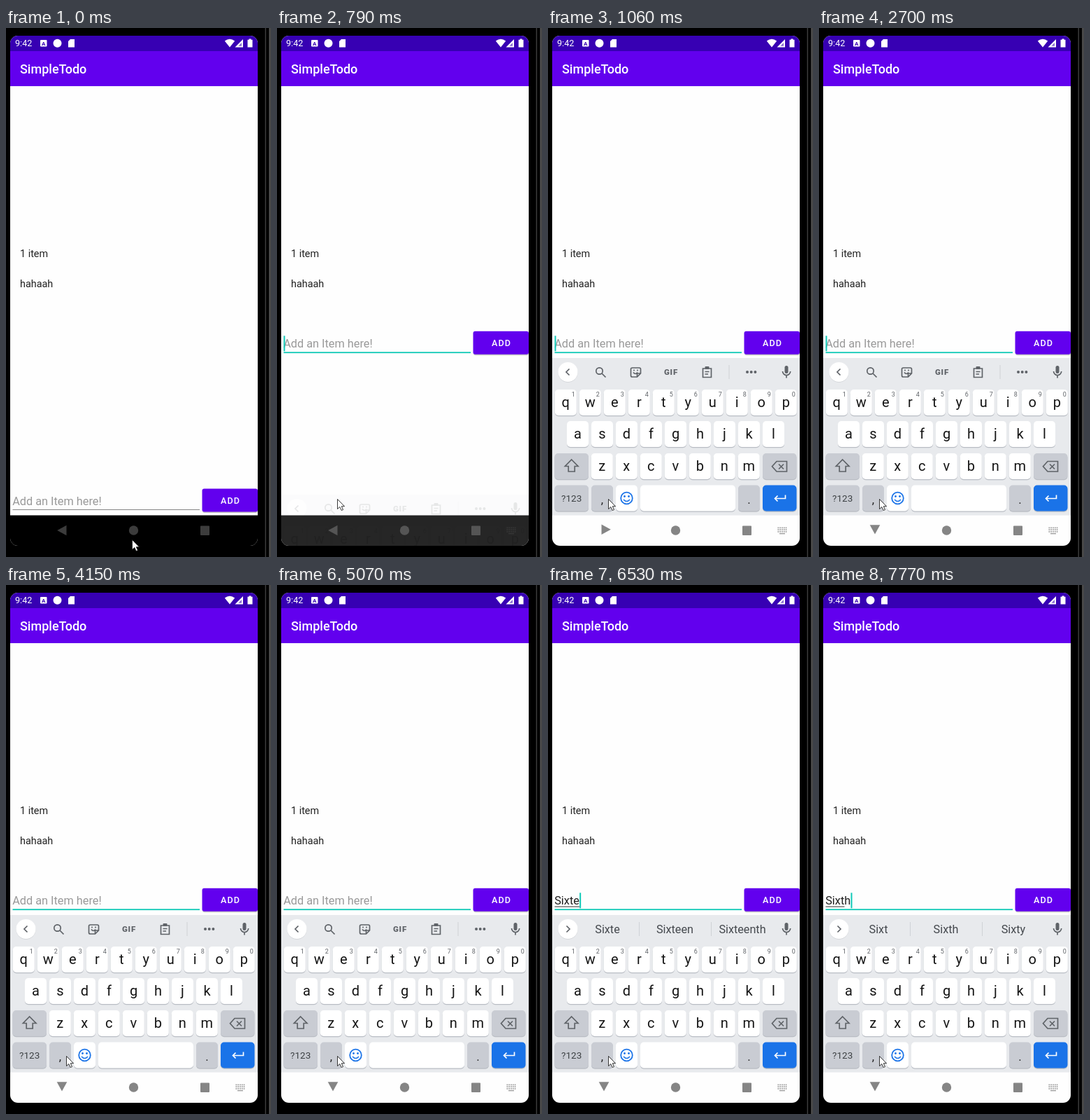
An HTML page that plays this animation: 379 by 755 pixels, repeating every 8 s.

```html
<!DOCTYPE html>
<html lang="en">
<head>
<meta charset="utf-8">
<title>Todo list</title>
<style>
html, body { margin: 0; width: 100%; height: 100%; overflow: hidden; background: #000; }
svg { display: block; width: 379px; height: 755px; font-family: Roboto, sans-serif; }
text { white-space: pre; }
.mid { text-anchor: middle; }
.line { fill: none; stroke: #5f6368; stroke-width: 1.7; }
</style>
</head>
<body>
<svg id="stage" viewBox="0 0 379 755"></svg>
<script>
const LOOP = 8000, TEAL = '#0fc9b7', GREY = '#5f6368';

const rect = (x, y, w, h, fill, r = 0, extra = '') =>
  `<rect x="${x}" y="${y}" width="${w}" height="${h}" rx="${r}" fill="${fill}" ${extra}/>`;
const circle = (x, y, r, fill, extra = '') => `<circle cx="${x}" cy="${y}" r="${r}" fill="${fill}" ${extra}/>`;
const path = (d, fill, extra = '') => `<path d="${d}" fill="${fill}" ${extra}/>`;
const line = (d, extra = '') => `<path class="line" d="${d}" ${extra}/>`;
const text = (x, y, size, fill, str, extra = '') =>
  `<text x="${x}" y="${y}" font-size="${size}" fill="${fill}" ${extra}>${str}</text>`;
const key = (x, y, w, fill = '#fff') =>
  rect(x, y + 1.2, w, 37, '#b9bdc4', 5) + rect(x, y, w, 37, fill, 5);

function letterRow(letters, first, y, digits) {
  return [...letters].map((c, i) => {
    const x = first + i * 35;
    return key(x - 15.5, y, 31) +
      text(x, y + 24.5, 20, '#151515', c, 'class="mid letter"') +
      (digits ? text(x + 11, y + 10, 9, GREY, (i + 1) % 10, 'class="mid"') : '');
  }).join('');
}

function keyboard() {
  const soft = '#c9ccd3';
  const toolbar =
    circle(73.5, 489.5, 4.7, 'none', 'class="line"') + line('M77 493l5.5 5.5', 'stroke-width="2"') +
    line('M120.5 485h10a2 2 0 0 1 2 2v6l-5 5h-7a2 2 0 0 1-2-2v-9a2 2 0 0 1 2-2zM132 493h-4.500v4.500M122 491.500q3 4 6 0') +
    circle(123, 488.5, 1, GREY) + circle(128, 488.5, 1, GREY) +
    text(176, 494.7, 11.5, GREY, 'GIF', 'class="mid" font-weight="900" letter-spacing=".8"') +
    line('M221.500 486h12v12.500h-12zM224.500 490.500h6M224.500 494h4.500') + rect(224.5, 483, 6, 4, GREY, 1) +
    rect(258.5, 481, 1, 20, '#cfd2d6') +
    [285, 290.7, 296.4].map(x => circle(x, 491, 2, GREY)).join('');
  const strip = [85, 181.5, 278].map(x => text(x, 497, 16.2, '#45494e', '', 'class="mid word"')).join('') +
    rect(130, 481, 1, 20, '#cfd2d6') + rect(233, 481, 1, 20, '#cfd2d6');
  return rect(6, 471, 354, 224.5, '#e8eaed') +
    circle(28.5, 491.8, 14, '#cfd2d6') + circle(28.5, 491, 14, '#fff') +
    line('M30.500 486.500L26 491L30.500 495.500', 'id="chevron"') +
    `<g id="toolbar">${toolbar}</g><g id="strip">${strip}</g>` +
    rect(338.5, 482, 5, 11, GREY, 2.5) + line('M335.500 490a5.600 5.600 0 0 0 11.200 0M341 495.500v4') +
    letterRow('qwertyuiop', 25.3, 516, true) +
    letterRow('asdfghjkl', 42.5, 561) +
    letterRow('zxcvbnm', 77.3, 607) +
    key(9.5, 607, 48.5, soft) +
    path('M33.700 616l9.300 9.500h-4.800v7.500h-9v-7.500h-4.800z', 'none', 'id="shift" class="line"') +
    key(307, 607, 48.5, soft) +
    line('M327 618.500h14.500v14.500h-14.500l-6.500-7.250zM330 622.500l7 7M337 622.500l-7 7') +
    key(9.5, 652.5, 48.5, soft) + text(33.7, 676, 13.5, '#3c4043', '?123', 'class="mid"') +
    key(62, 652.5, 31, soft) + text(77.5, 678.5, 17, '#222', ',', 'class="mid"') +
    key(97, 652.5, 31) +
    circle(112.5, 671, 8.3, 'none', 'stroke="#1a73e8" stroke-width="1.8"') +
    circle(109.5, 668.5, 1.4, '#1a73e8') + circle(115.5, 668.5, 1.4, '#1a73e8') +
    line('M108 673q4.500 5 9 0', 'style="stroke:#1a73e8"') +
    key(132, 652.5, 136) +
    key(272, 652.5, 31, soft) + text(287.5, 678.5, 17, '#222', '.', 'class="mid"') +
    key(307, 652.5, 48.5, '#1a73e8') +
    line('M339.500 666.500v5h-15M328.500 667.500l-4 4 4 4', 'style="stroke:#fff"');
}

const statusBar =
  rect(6, 11, 354, 22, '#3700b3') +
  text(13, 26.3, 12.6, '#fff', '9:42') +
  rect(49, 17, 9.5, 9.5, '#fff', 1) +
  text(53.8, 24.8, 8, '#3700b3', 'A', 'class="mid" font-weight="700"') +
  circle(73.5, 21.7, 6, '#fff') +
  path('M92 16h6v11.500h-9v-8.500z', '#fff') +
  path('M312.800 18.500q7.200-5.500 14.400 0l-7.200 9z', '#fff') +
  path('M339 16v11.500h-11.500z', '#fff') +
  path('M337 21v4.700h-4.700z', '#8a6bd2') +
  path('M347.500 15.500h3v1.200h2v10.800h-7v-10.800h2z', '#fff');

const entry =
  text(9.2, 681, 16.3, '#999', 'Add an Item here!', 'id="hint"') +
  text(9.2, 681, 16.3, '#202020', '', 'id="typed"') +
  rect(9.5, 683.3, 0, 1, '#333', 0, 'id="underline"') +
  rect(9.5, 687, 267.5, 1, '#858585', 0, 'id="rule"') +
  rect(9.5, 664, 2, 22, TEAL, 0, 'id="caret"') +
  rect(281, 659, 79, 33, '#000', 3, 'opacity=".22"') +
  rect(280.5, 657.5, 79.5, 33, '#6200ee', 3) +
  text(321, 678.7, 12.6, '#fff', 'ADD', 'class="mid" font-weight="500" letter-spacing="1.13"');

const nav =
  path('M-6.800 0L6.500 -7.300V7.300z', 'inherit', 'id="back"') +
  '<circle cx="182.500" cy="717" r="6.700"/><rect x="278" y="710.500" width="13" height="13.500" rx="1"/>' +
  `<g id="switcher">${[0, 1, 2].map(r => [0, 1, 2, 3, 4].map(c =>
    rect(328.5 + c * 2.8, 712.5 + r * 2.8, 1.7, 1.7, '#999')).join('')).join('')}${rect(331, 721, 8, 1.3, '#999')}</g>`;

const stage = document.getElementById('stage');
stage.innerHTML =
  `<clipPath id="screen">${rect(6, 11, 354, 728, '#000', 11)}</clipPath>` +
  rect(0, 0, 379, 755, '#000') + rect(370.5, 0, 1.5, 755, '#3a3a3a') + rect(376, 0, 3, 755, '#484848') +
  '<g clip-path="url(#screen)">' + rect(6, 11, 354, 728, '#fefefe') + statusBar +
  rect(6, 33, 354, 50, '#6200ee') +
  text(20, 65, 18, '#fff', 'SimpleTodo', 'font-weight="500"') +
  text(20, 326.5, 14.4, '#222', '1 item') + text(20, 370, 14.4, '#222', 'hahaah') +
  `<g id="entry">${entry}</g><g id="keyboard">${keyboard()}</g>` +
  rect(6, 695.5, 354, 44, '#000', 0, 'id="shade"') + `<g id="nav">${nav}</g></g>` +
  path('M.500.500V14.500L3.800 11.500L6.200 16.500L8.500 15.500L6.300 10.700H10.500z', '#fff',
    'id="pointer" stroke="#222" stroke-width=".9"');

const $ = id => document.getElementById(id);
const letters = [...document.querySelectorAll('.letter')];
const words = [...document.querySelectorAll('.word')];
const set = (id, attrs) => { for (const name in attrs) $(id).setAttribute(name, attrs[name]); };

// Each timeline row is [start time, ...values].
const pointer = [[0, 180, 730], [140, 142, 708], [260, 104, 684], [390, 86, 672]];
const panel = [[0, 225, 0, 1, '#3c3c3c'], [790, 195, .15, .85, '#555'], [910, 113, .55, .52, '#a6a6a6'], [1060, 0, 1, 0, '#858585']];
const typing = [[0, '', 0], [5620, 'S', 0], [5740, 'Si', 1], [5860, 'Si', 2], [6010, 'Six', 2],
  [6130, 'Sixt', 3], [6250, 'Sixte', 4], [6530, 'Sixte', 5], [6960, 'Sixt', 4], [7770, 'Sixth', 4]];
const suggestions = [[0, ''], [5860, 'Si Sir Six'], [6130, 'Six Sixth Sixty'], [6250, 'Sixt Sixth Sixty'],
  [6530, 'Sixte Sixteen Sixteenth'], [7090, 'Sixt Sixth Sixty']];
const blinks = [540, 1180, 1610, 2170, 2700, 3200, 3600, 4150, 4670, 5070, 5470, 7650, 7770];
const now = (rows, t) => rows.filter(row => row[0] <= t).pop().slice(1);

function draw(t) {
  const [px, py] = now(pointer, t);
  set('pointer', { transform: `translate(${px} ${py})` });

  const [drop, alpha, shade, tint] = now(panel, t);
  set('keyboard', { transform: `translate(0 ${drop})`, opacity: alpha });
  set('shade', { opacity: shade });
  set('nav', { fill: tint });
  set('switcher', { opacity: alpha });
  const turn = t < 1060 ? 0 : t < 1180 ? 180 : -90;
  set('back', { transform: `translate(${turn === 180 ? 83 : 80} ${turn ? 715.8 : 717}) rotate(${turn})` });

  const [value, marked] = now(typing, t), focused = t >= 540, typed = $('typed');
  set('entry', { transform: `translate(0 ${t < 790 ? 0 : -224.7})` });
  typed.textContent = value;
  set('hint', { opacity: value ? 0 : 1 });
  set('rule', { fill: focused ? TEAL : '#858585', height: focused ? 1.8 : 1 });
  set('underline', { width: marked ? typed.getSubStringLength(0, marked) : 0 });
  set('caret', {
    x: 9.5 + (value ? typed.getComputedTextLength() : 0),
    opacity: blinks.filter(b => b <= t).length % 2
  });

  const upper = t >= 5470 && t < 5620;
  letters.forEach(el => {
    el.textContent = upper ? el.textContent.toUpperCase() : el.textContent.toLowerCase();
  });
  set('shift', { fill: upper ? GREY : 'none', style: `fill:${upper ? GREY : 'none'}` });

  const [list] = now(suggestions, t);
  list.split(' ').forEach((word, i) => { words[i].textContent = word; });
  set('toolbar', { opacity: list ? 0 : 1 });
  set('strip', { opacity: list ? 1 : 0 });
  set('chevron', { transform: list ? 'rotate(180 28.5 491)' : '' });
}

const start = performance.now();
function tick() {
  draw((performance.now() - start) % LOOP);
  requestAnimationFrame(tick);
}
tick();
</script>
</body>
</html>
```
